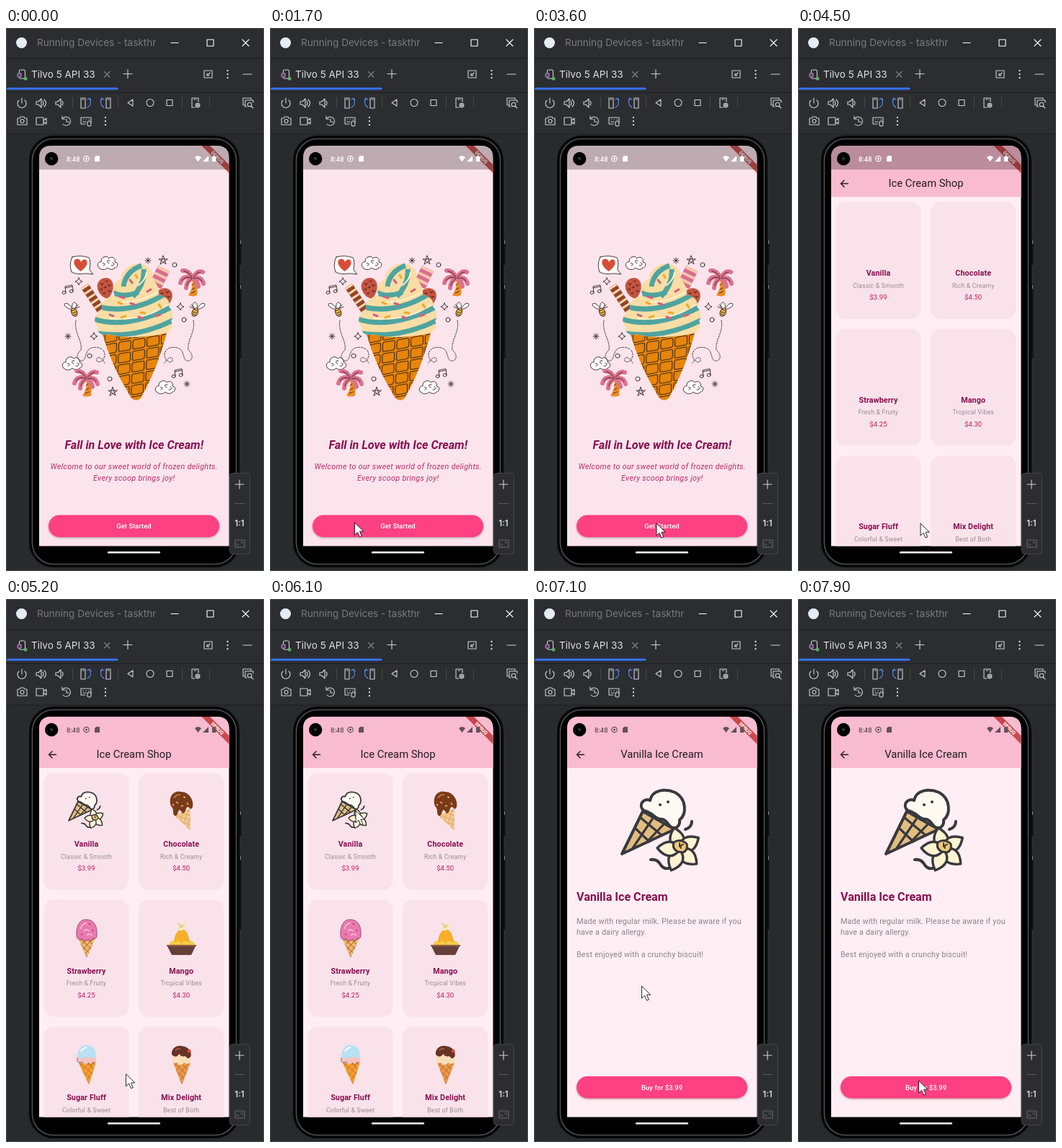
These frames come from a looping animation (358 by 752 pixels, 8000 ms). An HTML page:

```html
<!DOCTYPE html>
<html lang="en">
<head>
<meta charset="utf-8">
<title>Ice cream app</title>
<style>
html, body { margin: 0; width: 100%; height: 100%; overflow: hidden; background: #2b2d30; }
svg { display: block; }
text { font-family: Roboto, sans-serif; white-space: pre; }
.ide { font: 13.55px Inter, sans-serif; }
.mid { text-anchor: middle; }
.icon { fill: none; stroke: #ced0d6; stroke-width: 1.1; stroke-linecap: round; stroke-linejoin: round; }
.dot { fill: #ced0d6; stroke: none; }
.ink { fill: none; stroke: #30272b; stroke-width: .9; stroke-linecap: round; stroke-linejoin: round; }
.white { fill: #fffafa; }
.bold { stroke-width: 4; stroke: #39383d; stroke-linejoin: round; stroke-linecap: round; }
.title { font-size: 14.8px; fill: #241a1f; }
.head { font-size: 16.13px; font-weight: 700; fill: #880e4f; }
.hello { font: italic 10.75px Roboto, sans-serif; letter-spacing: .31px; fill: #b92d69; }
.label { font-size: 9.4px; font-weight: 500; letter-spacing: .07px; fill: #fff; }
.body { font-size: 10.75px; letter-spacing: .168px; fill: #8b8388; }
.name { font-size: 10.75px; font-weight: 700; letter-spacing: .1px; fill: #880e4f; }
.sub { font-size: 8.74px; letter-spacing: .168px; fill: #988c92; }
.price { font-size: 9.4px; letter-spacing: .1px; fill: #c2185b; }
</style>
</head>
<body>
<svg width="358" height="752" viewBox="0 0 358 752">
<defs>
  <clipPath id="screen"><path d="M46 717.500V180Q46 163 63 163H292.500Q309.500 163 309.500 180V717.500Z"/></clipPath>
  <clipPath id="swirl"><path id="swirlShape" d="M187 326C174 325 160 334 160 347C150 352 146 362 151 370C137 373 130 383 134 391C122 396 120 408 128 414C125 422 133 427 143 424C165 431 203 428 223 422C232 418 232 410 229 406C235 396 229 389 226 386C229 378 221 371 212 369C213 358 206 350 203 347C206 338 197 328 187 326Z"/></clipPath>
  <pattern id="tiles" width="20" height="15.500" patternUnits="userSpaceOnUse" patternTransform="translate(136 422) rotate(-10) skewX(-12)">
    <rect width="20" height="15.500" fill="#e8850b"/><rect x="1.500" y="1.500" width="17" height="12.500" rx="2.500" fill="#e8850b" stroke="#3b281d" stroke-width="1.100"/>
  </pattern>
  <pattern id="waffle" width="6" height="6" patternUnits="userSpaceOnUse" patternTransform="rotate(42)">
    <path d="M0 0H6M0 0V6" stroke="#a95b25" stroke-width="1.5"/>
  </pattern>
  <filter id="shade" x="-10%" y="-30%" width="120%" height="180%"><feDropShadow dx="0" dy="1.300" stdDeviation="1" flood-color="#66253f" flood-opacity=".4"/></filter>
  <path id="cloud" class="ink white" d="M-12 7C-16 4-13-2-9-1C-10-8-1-11 2-6C7-10 12-5 10-1C16 0 14 7 10 7C7 11 2 9 0 7C-4 11-9 10-12 7ZM-7 1C-3-1-3 4-6 4M3-3C-1-5-2 0 2 1M5 4C10 5 10 0 7 0"/>
  <path id="aster" class="ink" d="M-4 0H4M0-4V4M-3-3L3 3M-3 3L3-3"/>
  <path id="spark" class="ink" d="M0-5Q.7-.7 5 0Q.7 .7 0 5Q-.7 .7-5 0Q-.7-.7 0-5Z"/>
  <path id="star" class="ink" d="M-4 6L0-6L4 6L-6-1H6Z"/>
  <path id="note" class="ink" d="M-3 4L-4-4L6-6L7 2M-3 4A2.5 2 0 1 1-5 2.5Q-3 2-3 4ZM7 2A2.5 2 0 1 1 5 .6Q7 0 7 2ZM-4-2L6-4"/>
  <g id="palm">
    <path d="M0-4Q5 8-4 21Q2 24 8 21Q10 8 4-4Z" fill="#ed8b24"/>
    <path d="M4 5L1 7M5 11L1 13M5 16L0 18" class="ink"/>
    <path d="M1-4Q-4-14-12-13M0-3Q-12-7-15 4M1-2Q-7 2-7 11M3-4Q9-14 16-11M3-2Q14-6 17 5M4-2Q9 2 10 9" fill="none" stroke="#dd718d" stroke-width="6" stroke-linecap="round"/>
    <path d="M1-4Q-4-12-10-12M0-3Q-9-6-13 1M1-2Q-5 2-6 8M3-4Q8-11 13-11M3-2Q11-5 15 2" class="ink"/>
  </g>
  <g id="berry">
    <path d="M-11-4C-9-16 9-18 11-5C12 5 4 15 0 15C-6 13-12 5-11-4Z" fill="#c6533f"/>
    <path d="M-6-7l2 2l2-2M1-10l2 2l2-2M4-4l2 2l2-2M-8 0l2 2l2-2M-2-2l2 2l2-2M3 4l2 2l2-2M-5 6l2 2l2-2" stroke="#402723" fill="none"/>
  </g>
  <g id="side">
    <path class="ink" stroke-dasharray="2 1.6" d="M97 405C94 422 106 432 104 446C97 452 97 461 105 461C113 460 108 446 119 443C130 440 138 446 137 454C135 464 124 465 126 458C128 454 134 458 137 464"/>
    <g transform="translate(93 390)">
      <path class="ink white" d="M-1 0C-15-3-14-11-7-8C-4-6-2-3-1 0C-3-12 4-12 5-6C5-3 2-1-1 0Z"/>
      <ellipse cx="0" cy="4" rx="4" ry="6" transform="rotate(-25)" class="ink" style="fill:#eeb13c"/>
      <path class="ink" d="M-2 2L4-1M-1 5L5 3M1 8L5 6M4-2L9-4M3-3L7-7"/>
    </g>
  </g>
  <g id="vanilla">
    <path class="bold" fill="none" d="M210 319Q219 316 219 308M162 361Q171 360 175 367Q181 377 191 371"/>
    <path class="bold" fill="#e1bd80" d="M151 294L122 353L195 319Z"/>
    <path class="bold" fill="none" style="stroke-width:3.200" d="M140 317L160 336M148 303L177 327M137 345L164 305M157 336L180 312"/>
    <path class="bold" fill="#fffaf1" d="M152 293C144 285 152 275 161 279C164 264 182 262 196 268C212 277 212 298 202 306C203 312 199 318 193 317C186 315 185 306 178 305C168 306 165 295 152 293Z"/>
    <g fill="#39383d"><circle cx="175" cy="285" r="2"/><circle cx="186" cy="281" r="2"/></g>
    <g id="petals" transform="translate(202 347)" fill="#fff4d2" class="bold" style="stroke-width:3.400"></g>
    <path class="bold" style="stroke-width:3" fill="#f1ca77" d="M194 337Q203 331 212 339Q214 348 207 351L200 350Q191 346 194 337Z"/>
    <path d="M202 338V343M207 340Q202 341 204 345" class="bold" style="stroke-width:2" fill="none"/>
  </g>
  <path id="cone" d="M-12-1H12L1 25Q0 27-1 25Z"/>
</defs>

<!-- window -->
<rect width="358" height="752" fill="#2b2d30"/>
<rect y="148" width="358" height="604" fill="#282b2e"/>
<path d="M0 42.500H358M0 89.500H358M0 147H358" stroke="#1c1d20"/>
<rect x=".5" y=".5" width="357" height="751" fill="none" stroke="#484b4d"/>
<circle cx="21.500" cy="20.500" r="7.500" fill="#e4edf6"/>
<text class="ide" x="43" y="25" fill="#777a80">Running Devices - taskthr</text>
<text class="ide" x="35" y="69" fill="#dfe1e5">Tilvo 5 API 33</text>
<rect x="1" y="82.500" width="154.500" height="3" rx="1.500" fill="#3574f0"/>
<g class="icon">
  <path d="M229 20.500H239M279 16H288V25H279ZM328 16L337 25M337 16L328 25" stroke="#fff"/>
  <path d="M136.500 60.500L144 68M144 60.500L136.500 68" stroke="#85888e"/>
  <path d="M92.500 96V111M155.500 96V111M244.500 96V111M282.500 96V111" stroke="#43454a"/>
  <path d="M163 63.500H175M169 57.500V69.500M329 64H341M275 59H286V69H275ZM283 62L279 66M279 63V66H282"/>
  <rect x="18.500" y="58" width="8" height="12" rx="1.500"/><rect x="16" y="63" width="5" height="5" rx="1" fill="#54405a" stroke="#b889c5"/>
  <circle cx="27" cy="70" r="2.500" fill="#5fad65" stroke="none"/>
  <path d="M18 100A6 6 0 1 0 26 100M22 97V104"/>
  <path id="speaker" d="M42 102H45L49 98V110L45 106H42ZM51 101Q53 104 51 107"/>
  <path d="M53 99Q58 104 53 109"/>
  <use href="#speaker" x="27"/>
  <g id="turn"><path d="M104 97H110V111H104ZM106 99H108"/><path d="M113 110Q120 106 116 98M113 99L116 97L118 100" stroke="#548af7"/></g>
  <use href="#turn" transform="translate(249) scale(-1 1)"/>
  <path d="M176 99V108L169 103.500Z"/><circle cx="200" cy="103.500" r="5"/><path d="M223 99.500H231V107.500H223Z"/>
  <path d="M262 110H258V97H267V102M261 99H264"/><circle cx="266" cy="107" r="2.500"/><path d="M266 103V111M262 107H270M263 104L269 110M269 104L263 110" stroke-width=".7"/>
  <path d="M332 107H329V97H340V99M334 109H332V100H343V103"/><circle cx="338" cy="106" r="2.800"/><path d="M340 108L343 111"/>
  <path d="M16 125H19L20 123H25L26 125H29V134H16Z"/><circle cx="22.500" cy="129" r="2.500"/>
  <path d="M42 124H52V134H42ZM52 128L56 125V133L52 130"/>
  <path d="M79 125A6 6 0 1 1 79 133M78 122V126H82M84 126V130H87"/>
  <path d="M104 124H118V131M104 124V133H110M107 127H107.500M111 127H111.500M115 127H115.500M107 130H111"/><rect x="113" y="129" width="5" height="7" rx="2.500"/>
  <g class="dot" id="dots"><circle cx="138" cy="124" r="1.200"/><circle cx="138" cy="129" r="1.200"/><circle cx="138" cy="134" r="1.200"/></g>
  <use href="#dots" x="169.500" y="-65"/>
</g>

<!-- phone -->
<path d="M325 293V328M325 355V458" stroke="#111315" stroke-width="3"/>
<path d="M325.500 294V299M325.500 356V361" stroke="#8b8e91"/>
<rect x="32" y="149" width="292" height="598" rx="34" fill="#060707"/>
<rect x="36.500" y="153.500" width="283" height="589" rx="29.500" fill="#000" stroke="#4b4e50" stroke-width="1.600"/>
<g clip-path="url(#screen)">
  <g id="welcome">
    <rect x="45" y="163" width="265" height="555" fill="#fce4ec"/>
    <path class="ink white" d="M92 317Q104 314 115 318Q118 322 116 335L121 341L111 340Q98 342 91 338Q87 327 92 317Z"/>
    <path d="M104 337C93 330 92 321 98 320Q102 319 104 324Q107 319 111 321C116 326 109 333 104 337Z" fill="#d84d39"/>
    <use href="#cloud" x="141" y="325"/><use href="#cloud" x="92" y="464"/><use href="#cloud" x="221" y="497"/>
    <use href="#aster" x="197" y="322"/><use href="#aster" x="86" y="427"/><use href="#aster" x="251" y="493"/>
    <use href="#spark" x="101" y="351"/><use href="#spark" x="122" y="427"/><use href="#spark" x="242" y="386"/>
    <use href="#star" x="218" y="321"/><use href="#star" x="148" y="503"/>
    <use href="#note" x="86" y="362"/><use href="#note" x="238" y="478"/>
    <g class="ink"><circle cx="234" cy="328" r="3"/><circle cx="247" cy="404" r="3"/><circle cx="116" cy="454" r="3"/><circle cx="144" cy="486" r="3"/></g>
    <use href="#palm" x="257" y="349"/><use href="#palm" x="110" y="488"/>
    <use href="#side"/><use href="#side" transform="translate(357) scale(-1 1)"/>
    <use href="#berry" transform="translate(138 360) rotate(-8)"/><use href="#berry" transform="translate(219 374) rotate(12)"/>
    <g fill="none" stroke-width="12">
      <path d="M109 357L134 394" stroke="#98442b"/><path d="M109 357L134 394" stroke="#f5d9ad" stroke-dasharray="3 5"/>
      <path d="M219 333L207 358" stroke="#d96d8c" stroke-width="18"/><path d="M219 333L207 358" stroke="#f4c8ad" stroke-width="18" stroke-dasharray="4 5"/>
    </g>
    <path d="M133 421Q178 430 224 419Q211 470 188 511Q181 520 173 511Q146 468 133 421Z" fill="url(#tiles)"/>
    <use href="#swirlShape" fill="#f8dda5"/>
    <g clip-path="url(#swirl)" fill="none" stroke="#4fa49f" stroke-width="7">
      <path d="M163 358Q166 337 188 329M176 372Q193 354 191 334M149 366Q160 374 184 366M132 387Q176 396 221 368M122 403Q166 418 231 386M126 423Q180 431 233 404"/>
      <path d="M183 357Q194 349 195 338M157 380Q185 381 210 366M143 402Q190 407 224 383" stroke="#fff2ce" stroke-width="2"/>
    </g>
    <path d="M158 372l6 2M173 381l5 2M196 365l5-3M208 399l6-2M144 397l5 2M184 400l5 2M172 349l3 4" stroke="#d85f7e" stroke-width="3" stroke-linecap="round"/>
    <path d="M156 380l5 2M187 394l6 1M212 383l3 4M160 401l6-2M180 342l2 4" stroke="#ecac26" stroke-width="3" stroke-linecap="round"/>
    <text class="head mid" style="font-style:italic" x="177.700" y="583">Fall in Love with Ice Cream!</text>
    <text class="hello mid" x="177.700" y="610.500">Welcome to our sweet world of frozen delights.</text>
    <text class="hello mid" x="177.700" y="626.500">Every scoop brings joy!</text>
    <rect x="59" y="674.500" width="237" height="30.500" rx="15.250" fill="#ff4081" filter="url(#shade)"/>
    <text class="label mid" x="177.500" y="693">Get Started</text>
  </g>

  <g id="inner">
    <rect x="45" y="163" width="265" height="555" fill="#ffeef4"/>
    <rect x="45" y="163" width="265" height="71" fill="#f8bbd0"/>
    <path d="M70 215.500H60M64.500 210.500L59.500 215.500L64.500 220.500" fill="none" stroke="#241a1f" stroke-width="1.400"/>
    <text class="title mid" id="title" x="177.500" y="220"></text>
    <g id="shop">
      <g id="cards"></g>
      <g id="treats">
        <use href="#vanilla" transform="translate(32 148.200) scale(.45)"/>
        <g>
          <use href="#cone" transform="translate(245 296) rotate(-24)" fill="#f2ca8d"/>
          <use href="#cone" transform="translate(245 296) rotate(-24)" fill="url(#waffle)" opacity=".4"/>
          <path d="M229 287C224 273 234 264 243 267C253 267 261 277 259 288Q257 293 254 289Q251 286 249 293Q246 300 243 294Q240 289 238 298Q233 304 232 295Q232 289 229 287Z" fill="#793a19"/>
          <path d="M233 276Q237 269 242 272" fill="none" stroke="#b9723f" stroke-width="2"/>
          <path d="M236 281l3 2M246 274l3 1M251 282l2 3M243 287l3-1M231 284l2 2" stroke="#d9a056" stroke-width="2"/>
        </g>
        <g>
          <use href="#cone" x="112" y="470" fill="#edb96e"/><use href="#cone" x="112" y="470" fill="url(#waffle)"/>
          <path d="M98 466C97 449 105 443 112 444C122 444 127 453 126 466Q126 471 121 470Q118 476 114 471Q109 476 106 471Q98 473 98 466Z" fill="#ea79ae" stroke="#823c60" stroke-width=".8"/>
          <path d="M103 457Q106 449 112 449M108 460q4-4 8 0M112 466q4-4 8 0" fill="none" stroke="#ffc0dc" stroke-width="1.500"/>
          <path d="M115 449l2 2M120 458l1 2M104 464l2 1" stroke="#a6346d" stroke-width="1.500"/>
        </g>
        <g>
          <path d="M226 480Q230 472 233 474C234 464 239 457 245 457C252 460 253 466 255 474Q261 473 262 480Z" fill="#f8af27"/>
          <path d="M226 478q5-8 9-2q4-6 8 1q5-7 10-1q6-5 9 3Z" fill="#f5cc4a"/>
          <path d="M238 458L237 446L243 452L250 445L248 457Q243 461 238 458Z" fill="#f5e6bd"/><path d="M240 449L243 455L246 451" fill="none" stroke="#c5a546"/>
          <path d="M223 479H264L257 493H230Z" fill="#654039"/><path d="M223 480H264" stroke="#8c5e4c" stroke-width="2"/>
        </g>
        <g>
          <use href="#cone" transform="translate(113 643) rotate(-4) scale(1 1.100)" fill="#f6a12d"/><use href="#cone" transform="translate(113 643) rotate(-4) scale(1 1.100)" fill="url(#waffle)" opacity=".6"/>
          <path d="M100 634C98 641 103 645 107 641Q110 648 114 642Q118 648 121 641Q127 643 125 633Z" fill="#f9c3bd"/>
          <path d="M99 635C99 622 107 616 113 618C122 619 127 627 124 636Q120 637 118 633Q114 639 110 634Q105 639 99 635Z" fill="#b9e0f4"/>
          <path d="M104 627Q107 621 112 621" stroke="#fff" fill="none" stroke-width="2"/>
          <path d="M99 635Q97 645 107 641M114 642Q118 648 121 641" stroke="#693f44" fill="none" stroke-width=".8"/>
        </g>
        <g>
          <use href="#cone" transform="translate(244 643) scale(1 1.100)" fill="#ec9947"/><use href="#cone" transform="translate(244 643) scale(1 1.100)" fill="url(#waffle)" opacity=".7"/>
          <path d="M231 632Q230 646 237 642Q242 649 247 642Q255 647 257 637L253 629Z" fill="#f9dfba"/>
          <path d="M230 631C229 622 237 618 243 619C253 619 259 628 256 634Q252 639 249 633Q244 635 240 630Q236 637 230 631Z" fill="#693326"/>
          <path d="M235 625Q238 622 242 623" stroke="#a56c4d" fill="none" stroke-width="1.500"/>
          <circle cx="254" cy="626" r="2.500" fill="#d94238"/>
        </g>
      </g>
    </g>
    <g id="detail">
      <use href="#vanilla"/>
      <text class="head" x="59" y="418">Vanilla Ice Cream</text>
      <text class="body" x="59" y="449.500">Made with regular milk. Please be aware if you</text>
      <text class="body" x="59" y="465">have a dairy allergy.</text>
      <text class="body" x="59" y="496">Best enjoyed with a crunchy biscuit!</text>
      <rect x="59" y="661" width="237" height="30.500" rx="15.250" fill="#ff4081" filter="url(#shade)"/>
      <text class="label mid" x="177.500" y="680">Buy for $3.99</text>
    </g>
  </g>

  <g transform="translate(309.500 163) rotate(45)">
    <rect x="-30" y="18.800" width="60" height="8.100" fill="#b71c1c" fill-opacity=".72"/>
    <text class="mid" y="25.300" font-size="6.850" font-weight="900" fill="#fff">DEBUG</text>
  </g>
  <rect id="scrim" x="45" y="163" width="265" height="33" opacity=".25"/>
  <g id="status">
    <text x="84" y="184.500" font-size="9.400" font-weight="500">8:48</text>
    <circle cx="111.500" cy="181" r="3.700" fill="none" stroke="currentColor" stroke-width="1.200"/><circle cx="111.500" cy="181" r="1.500"/>
    <path d="M125 177H130V185H123V179ZM262 179Q266.500 175 271 179L266.500 185ZM281 177V185H273ZM286 178H287.500V177H290V178H291.500V185H286Z"/>
  </g>
</g>
<circle cx="63.200" cy="181" r="9.200"/><circle cx="63.200" cy="181" r="2.500" fill="#17242b"/><circle cx="62.800" cy="180.500" r=".8" fill="#557079"/>
<rect x="141" y="725" width="73" height="2.400" rx="1.200" fill="#fff"/>
<rect x="310.500" y="616.500" width="28" height="112" rx="4" fill="#2b2d30" stroke="#414348"/>
<path class="icon" d="M318 632H330M324 626V638"/><path d="M317 658.500H331" stroke="#575a60"/>
<text class="ide mid" x="324" y="690" style="font-size:11.500px;font-weight:600" fill="#dfe1e5">1:1</text>
<path class="icon" style="stroke:#656870" d="M318 709H331V719H318ZM321 714V716H323M328 714V712H326"/>
<path id="cursor" d="M0 0V17L4 13.300L7 20L9.800 18.800L7 12.200H12.300Z" fill="#fff" stroke="#111" stroke-width=".9"/>
</svg>
<script>
const $ = id => document.getElementById(id);
const show = (id, on) => $(id).setAttribute('display', on ? 'inline' : 'none');

$('petals').innerHTML = [-14, 58, 130, 202, 274].map(a =>
  `<path transform="rotate(${a})" d="M0 0C-14-8-12-20 0-31C12-20 14-8 0 0Z"/>`).join('');

const flavours = [
  ['Vanilla', 'Classic & Smooth', '$3.99'], ['Chocolate', 'Rich & Creamy', '$4.50'],
  ['Strawberry', 'Fresh & Fruity', '$4.25'], ['Mango', 'Tropical Vibes', '$4.30'],
  ['Sugar Fluff', 'Colorful & Sweet', ''], ['Mix Delight', 'Best of Both', '']
];
$('cards').innerHTML = flavours.map(([name, sub, price], i) => {
  const x = 52.5 + i % 2 * 131.7, y = 241 + (i >> 1) * 175.6;
  const line = (cls, dy, s) => `<text class="${cls} mid" x="${x + 59}" y="${y + dy}">${s.replace('&', '&amp;')}</text>`;
  return `<rect x="${x}" y="${y}" width="118" height="162" rx="13.5" fill="#fae2eb"/>` +
    line('name', 102, name) + line('sub', 118.5, sub) + line('price', 135, price);
}).join('');

// Pointer stops: time, x, y
const stops = [
  [800, -14, 57], [1700, 117.5, 685], [1900, 132, 685], [3200, 132, 685], [3600, 170, 686],
  [5100, 170, 686], [5700, 123, 305], [6100, 119, 293], [6500, 119, 293],
  [7100, 149.5, 536], [7200, 149.5, 536], [7900, 167.5, 667]
];

function pointer(t) {
  const i = stops.findIndex(s => s[0] > t);
  if (i === 0) return [-30, 0];
  if (i < 0) return stops.at(-1).slice(1);
  const [a, b] = [stops[i - 1], stops[i]];
  const p = (t - a[0]) / (b[0] - a[0]), e = p * p * (3 - 2 * p);
  return [a[1] + (b[1] - a[1]) * e, a[2] + (b[2] - a[2]) * e];
}

function draw(now) {
  const t = Math.floor(now % 8000 / 100) * 100;
  const dim = t < 4600;
  show('welcome', t < 4500);
  show('inner', t >= 4500);
  show('shop', t < 6400);
  show('detail', t >= 6400);
  show('treats', t >= 4600);
  show('scrim', dim);
  $('title').textContent = t < 6400 ? 'Ice Cream Shop' : 'Vanilla Ice Cream';
  $('status').style.fill = $('status').style.color = dim ? '#fff' : '#63505a';
  $('cursor').setAttribute('transform', `translate(${pointer(t)})`);
  requestAnimationFrame(draw);
}
requestAnimationFrame(draw);
</script>
</body>
</html>
```
